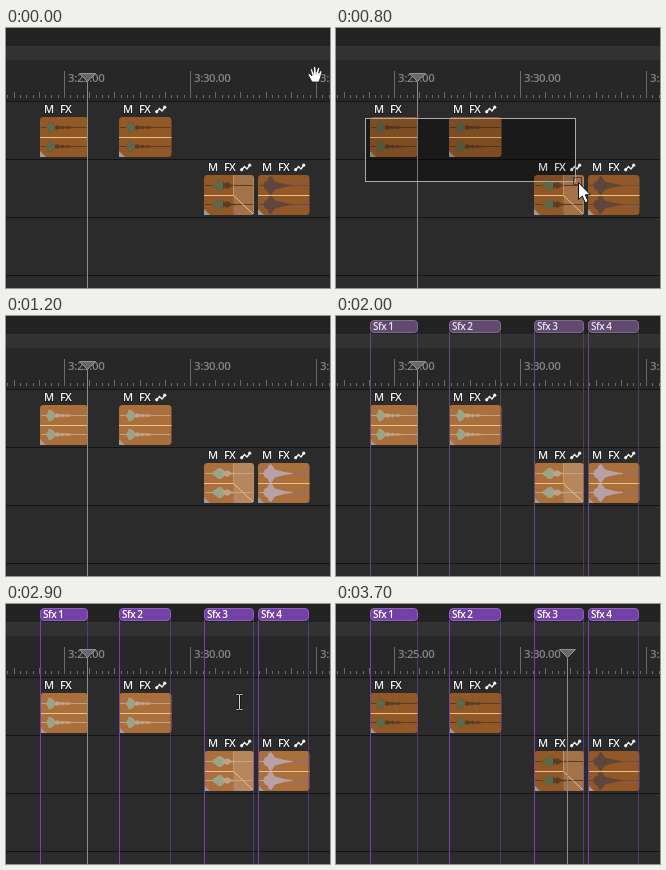
An HTML page for the animation above (4800 ms loop, 324 px wide and 260 px high).

```html
<!DOCTYPE html>
<html lang="en">
<head>
<meta charset="utf-8">
<title>Timeline regions</title>
<style>
html, body { margin: 0; width: 100%; height: 100%; overflow: hidden; background: #2b2b2b; }
svg { display: block; width: 324px; height: 260px; }
text { font-family: "Open Sans", "Noto Sans", sans-serif; font-weight: 600; }
.time { font-size: 11.5px; letter-spacing: -.4px; fill: #848484; }
.tag { font-size: 11px; fill: #f4f4f4; stroke: #1a1a1a; stroke-width: 1.5px; paint-order: stroke; }
.region { font-size: 10px; letter-spacing: -.5px; fill: #fff; }
</style>
</head>
<body>
<svg id="stage" viewBox="0 0 324 260"></svg>
<script>
const LOOP = 4800;
const NS = "http://www.w3.org/2000/svg";
const stage = document.getElementById("stage");

function add(parent, tag, attrs = {}, text) {
  const node = document.createElementNS(NS, tag);
  set(node, attrs);
  if (text) node.textContent = text;
  parent.appendChild(node);
  return node;
}
function set(node, attrs) {
  for (const key in attrs) node.setAttribute(key, attrs[key]);
}
const rect = (p, x, y, width, height, fill, more) => add(p, "rect", { x, y, width, height, fill, ...more });
const path = (p, d, fill, more) => add(p, "path", { d, fill, ...more });
const show = (node, on) => node.setAttribute("visibility", on ? "visible" : "hidden");
const move = (node, x, y) => node.setAttribute("transform", `translate(${x} ${y})`);

// Clip bounds and waveform envelopes as [offset, amplitude]
const burst = [[6, 0], [8, 3], [9, 6], [11, 5], [13, 4], [15, 1.5], [18, 2.2], [20, 1], [23, 1.8], [25, .8], [28, 1.5], [30, .7], [34, .5]];
const clips = [
  { x: 34, y: 89, w: 48, wave: burst, head: 16 },
  { x: 113, y: 89, w: 52.5, wave: burst.map(([x, a]) => [x + 1, a]), head: 17, icon: true },
  { x: 198, y: 147, w: 50, wave: [[8, 0], [10, 2], [12, 3], [14, 5], [17, 5.5], [19, 3.5], [21, 2], [23, 3.5], [25, 2.5], [27, 1], [33, .5]], head: 20, icon: true, fade: 29.5 },
  { x: 252, y: 147, w: 51.5, wave: [[5, 0], [7, 4], [9, 4.5], [11, 8.5], [13, 9.5], [15, 7], [17, 4], [20, 3.2], [23, 2.4], [27, 1.5], [34, .6]], head: 0, icon: true, cool: true }
];

function drawBackdrop() {
  rect(stage, 0, 0, 324, 260, "#2b2b2b");
  rect(stage, 0, 0, 324, 18, "#222");
  rect(stage, 0, 18, 324, 14, "#323232");
  rect(stage, 0, 32, 324, 41, "#272727");
  for (const y of [73, 131, 189, 247]) rect(stage, 0, y, 324, 1, "#141414");
  for (let i = -9; i < 43; i++) {
    const x = Math.round(58 + i * 6.3);
    const h = i % 20 === 0 ? 27 : i % 4 === 0 ? 6 : 3;
    rect(stage, x, 70 - h, 1, h, "#6a6a6a");
  }
  ["3:25.00", "3:30.00", "3:35.00"].forEach((label, i) =>
    add(stage, "text", { x: 62 + i * 126, y: 54, class: "time" }, label));
}

function drawClip(clip) {
  const { x, y, w } = clip;
  const g = add(stage, "g");
  clip.body = rect(g, x, y, w, 40, "", { rx: 3.5 });
  if (clip.fade) rect(g, x + clip.fade, y, w - clip.fade, 40, "#fff", { "fill-opacity": .16, rx: 2 });
  clip.tails = [];
  clip.heads = [];
  for (const mid of [y + 10.5, y + 29.5]) {
    clip.tails.push(rect(g, x + 1, mid - .5, w - 2, 1, ""));
    if (clip.cool) rect(g, x + 35, mid - .5, w - 36, 1, "#63518c", { opacity: .65 });
    const line = points => {
      const top = points.map(([dx, a]) => `${x + dx} ${mid - a}`);
      const low = points.map(([dx, a]) => `${x + dx} ${mid + a}`).reverse();
      return "M" + top.concat(low).join("L") + "Z";
    };
    clip.tails.push(path(g, line(clip.wave), ""));
    if (clip.head) clip.heads.push(path(g, line(clip.wave.filter(p => p[0] <= clip.head)), ""));
  }
  const end = clip.fade ? `H${x + clip.fade}L${x + w - 1} ${y + 39}` : `H${x + w}`;
  path(g, `M${x} ${y + 20.5}${end}`, "none", { stroke: "#eec08d", "stroke-width": 1 });
  if (clip.fade) {
    rect(g, x + 29, y, 1, 20, "#d6a577", { opacity: .7 });
    rect(g, x + w - 1, y + 2, 1, 37, "#a79a8b", { opacity: .6 });
  }
  path(g, `M${x} ${y + 34}l6 6h-6z`, "#a19b94");

  const tag = (dx, label, gap) =>
    add(stage, "text", { x: x + dx, y: y - 4, class: "tag", "letter-spacing": gap }, label);
  tag(4, "M", 0);
  tag(20, "FX", -.8);
  if (clip.icon) {
    const icon = add(stage, "g", { transform: `translate(${x + 36} ${y - 12})` });
    path(icon, "M1.5 7L4.5 3.5L7 6L10 2", "none", { stroke: "#f4f4f4", "stroke-width": 1.3 });
    for (const [cx, cy] of [[1.7, 6.7], [9.7, 2.2]]) add(icon, "circle", { cx, cy, r: 1.6, fill: "#f4f4f4" });
  }
}

function paintClip(clip, selected) {
  set(clip.body, { fill: selected ? "#aa6f3b" : "#925826" });
  const tail = clip.cool ? (selected ? "#b7a1a6" : "#60453d") : (selected ? "#bda38b" : "#5b3d26");
  clip.tails.forEach(node => set(node, { fill: tail }));
  clip.heads.forEach(node => set(node, { fill: selected ? "#9aa487" : "#5f6947" }));
}

function drawRegions() {
  const g = add(stage, "g");
  const boxes = clips.map(({ x, w }, i) => {
    const right = Math.floor(x + w - .6);
    rect(g, x, 16, 1, 244, "", { class: "edge" });
    rect(g, right, 16, 1, 244, "", { class: "edge", opacity: .6 });
    const box = rect(g, x + .5, 4.5, right - x, 12, "", { rx: 3.5 });
    add(g, "text", { x: x + 3, y: 14, class: "region" }, "Sfx " + (i + 1));
    return box;
  });
  return { g, boxes, edges: [...g.querySelectorAll(".edge")] };
}

function paintRegions(lit) {
  regions.boxes.forEach(box => set(box, { fill: lit ? "#7341a5" : "#614a70", stroke: lit ? "#9160c2" : "#806a8e" }));
  regions.edges.forEach(edge => set(edge, { fill: lit ? "#7643a9" : "#674b7a" }));
  regions.g.querySelectorAll("text").forEach(label => set(label, { "fill-opacity": lit ? 1 : .85 }));
}

function drawHand() {
  const g = add(stage, "g");
  path(g, "M4 16L1 10.5Q-.5 8 1 7.5Q2.5 7.5 4 10L2.5 4Q2.5 2 4 2.3L5.5 6.5L5.5 1.5Q6.5-.5 7.7 1.3L8.2 6.2L9.5 1.8Q11 .6 11.5 2.5L10.8 7L12.3 4.6Q14 4 13.9 6L12.5 11.5L11 16Z",
    "#fff", { stroke: "#151515", "stroke-width": .8 });
  path(g, "M5.5 6v3M8.2 6v3M10.8 7v2", "none", { stroke: "#666", "stroke-width": .5 });
  return g;
}

function drawArrow() {
  const g = add(stage, "g");
  rect(g, -4.5, -4.5, 8, 7, "none", { stroke: "#050505", "stroke-dasharray": "1 1" });
  path(g, "M.5 .5V17.5L4.3 14L7.2 20.8L10.2 19.5L7.3 12.8H12.3Z", "#fff", { stroke: "#111", "stroke-width": 1 });
  return g;
}

function drawBeam() {
  const g = add(stage, "g");
  const d = "M-3 -7.5H-1Q0 -7.5 0 -6.5Q0 -7.5 1 -7.5H3M0 -6.5V6.5M-3 7.5H-1Q0 7.5 0 6.5Q0 7.5 1 7.5H3";
  path(g, d, "none", { stroke: "#151515", "stroke-width": 2.4 });
  path(g, d, "none", { stroke: "#d8d8d8", "stroke-width": 1 });
  return g;
}

drawBackdrop();
const shade = rect(stage, 29.5, 90.5, 0, 0, "#000", { "fill-opacity": .3 });
clips.forEach(drawClip);
const regions = drawRegions();
const head = add(stage, "g");
rect(head, 0, 53, 1, 207, "#8c8c8c");
path(head, "M-7.5 45.5H8.5L.5 53.5Z", "#686868", { stroke: "#929292", "stroke-width": 1 });
const marquee = rect(stage, 29.5, 90.5, 0, 0, "#000", { "fill-opacity": .14, stroke: "#aaa", "stroke-width": 1 });
const hand = drawHand(), arrow = drawArrow(), beam = drawBeam();

// Pointer positions per 100 ms tick; the last pair is the marquee corner
const handSteps = [[302, 38], [288, 44]];
const arrowSteps = [[225, 74], [118, 86], [36, 91], [29, 90, 30, 91], [95, 113, 90, 111],
  [178, 138, 175, 136], [242, 154, 240, 153], [264, 160, 262, 159], [271, 163, 269, 162], [273, 164, 271, 163]];
const beamSteps = [[271, 95.5], [251, 97], [233.5, 98]];
const exitSteps = [[236, 97.5], [268, 93], [310, 89]];

function place(node, pos) {
  show(node, !!pos);
  if (pos) move(node, pos[0], pos[1]);
}

function render(t) {
  const tick = Math.floor(t / 100);
  const point = arrowSteps[tick - 2];
  place(hand, handSteps[tick]);
  place(arrow, point);
  const dragging = !!point && point.length > 2;
  for (const box of [shade, marquee]) {
    show(box, dragging);
    if (dragging) set(box, { width: point[2] - 30, height: point[3] - 90 });
  }
  clips.forEach(clip => paintClip(clip, tick >= 12 && tick < 34));
  show(regions.g, tick >= 20);
  paintRegions(tick >= 24);
  place(beam, tick >= 34 ? exitSteps[tick - 34] : beamSteps[Math.min(tick - 27, 2)]);
  move(head, tick < 34 ? 81 : 231, 0);
}

const start = performance.now();
function frame() {
  render((performance.now() - start) % LOOP);
  requestAnimationFrame(frame);
}
frame();
</script>
</body>
</html>
```
